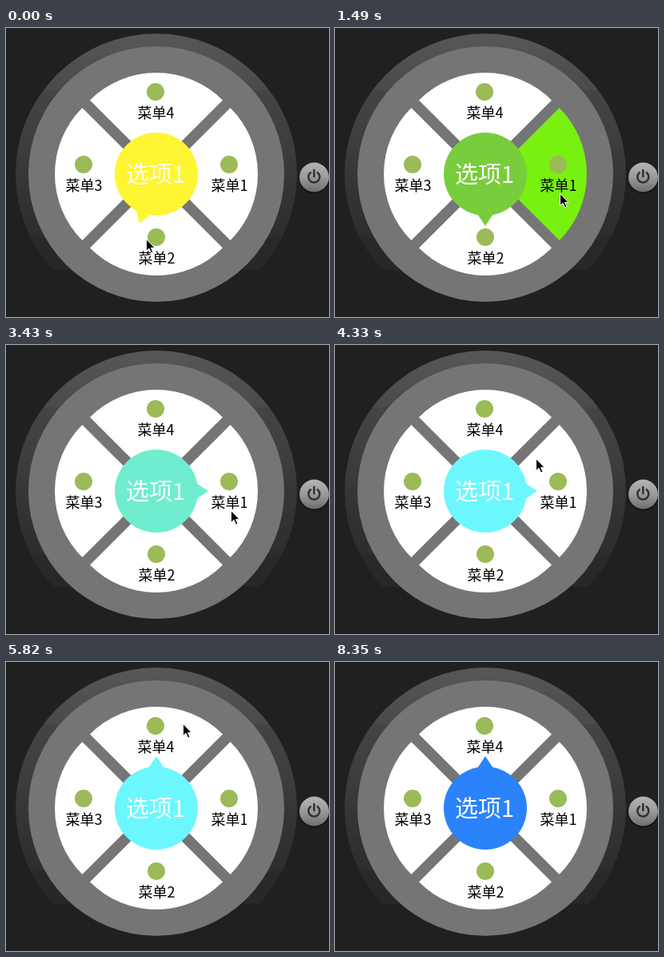
These frames come from a looping animation (404x362 px, 8800 ms). An HTML page:

```html
<!DOCTYPE html>
<html lang="zh-CN">
<head>
<meta charset="utf-8">
<title>Radial menu</title>
<style>
  html, body { margin: 0; width: 100%; height: 100%; overflow: hidden; background: #202020; }
  svg { display: block; width: 404px; height: 362px; }
  text { font-family: "Noto Sans CJK SC", "Noto Sans CJK JP", "Noto Sans CJK", sans-serif; text-anchor: middle; }
  .label { font-size: 18px; font-weight: 500; }
  .title { font-size: 29px; fill: #fff; }
</style>
</head>
<body>
<svg viewBox="0 0 404 362">
  <defs>
    <linearGradient id="rim" gradientUnits="userSpaceOnUse" x1="0" y1="7" x2="0" y2="303">
      <stop offset="0" stop-color="#575757"/>
      <stop offset=".24" stop-color="#4a4a4a"/>
      <stop offset=".24" stop-color="#444"/>
      <stop offset=".435" stop-color="#3f3f3f"/>
      <stop offset=".6" stop-color="#363636"/>
      <stop offset=".86" stop-color="#2d2d2d"/>
      <stop offset=".86" stop-color="#292929"/>
      <stop offset="1" stop-color="#272727"/>
    </linearGradient>
    <linearGradient id="knob" x1="0" y1="0" x2="0" y2="1">
      <stop offset="0" stop-color="#b4b4b4"/>
      <stop offset=".5" stop-color="#9a9a9a"/>
      <stop offset="1" stop-color="#6e6e6e"/>
    </linearGradient>
    <clipPath id="upper"><rect width="404" height="303"/></clipPath>
  </defs>

  <rect width="404" height="362" fill="#202020"/>
  <circle cx="188" cy="183" r="176" fill="url(#rim)" clip-path="url(#upper)"/>
  <circle cx="188" cy="183" r="160" fill="#757575"/>
  <g id="menu"></g>

  <g id="hub">
    <circle cx="188" cy="183" r="52"/>
    <path id="tail" d="M178 133L188 118L198 133Z"/>
  </g>
  <text class="title" x="187" y="194">选项1</text>

  <circle cx="385.5" cy="188" r="19.5" fill="#151515"/>
  <circle cx="385.5" cy="187" r="18.5" fill="url(#knob)"/>
  <g fill="none" stroke="#333" stroke-width="2.6" stroke-linecap="round">
    <path d="M380.8 181.2A7 7 0 1 0 389.8 181.2"/>
    <path d="M385.3 178V186"/>
  </g>

  <path id="cursor" d="M.5 .5V15.5L4 12.2L6.6 18L9 17L6.5 11.4H11Z" fill="#000" stroke="#fff"/>
</svg>
<script>
const LOOP = 8800;
const $ = id => document.getElementById(id);
const NS = 'http://www.w3.org/2000/svg';

function add(parent, tag, attrs, text = '') {
  const el = document.createElementNS(NS, tag);
  for (const k in attrs) el.setAttribute(k, attrs[k]);
  el.textContent = text;
  return parent.appendChild(el);
}

// Four quarter pies, each pushed outward to leave the diagonal gaps.
const items = [
  { angle: 90, x: 279, y: 171, label: '菜单1' },
  { angle: 180, x: 188, y: 262, label: '菜单2' },
  { angle: 270, x: 97, y: 171, label: '菜单3' },
  { angle: 0, x: 187, y: 80, label: '菜单4' }
];
const wedges = items.map(({ angle, x, y, label }) => {
  const wedge = add($('menu'), 'path', {
    d: 'M188 173.4L105 90.4A117.4 117.4 0 0 1 271 90.4Z',
    transform: `rotate(${angle} 188 183)`
  });
  add($('menu'), 'circle', { cx: x, cy: y, r: 11, fill: '#9bba58' });
  add($('menu'), 'text', { class: 'label', x: x + .5, y: y + 33 }, label);
  return wedge;
});

// Each move: first step, last step, number of steps, from, to.
const YELLOW = [255, 245, 50], GREEN = [120, 205, 60], CYAN = [108, 247, 255], BLUE = [42, 131, 251];
const colors = [
  [1340, 1490, 2, YELLOW, GREEN],
  [3130, 3580, 4, GREEN, CYAN],
  [7010, 7160, 2, CYAN, BLUE]
];
const turns = [
  [150, 150, 1, [199], [180]],
  [1630, 2080, 4, [180], [90]],
  [5230, 5820, 5, [90], [0]]
];
const moves = [
  [590, 740, 2, [175, 264], [281, 207]],
  [4180, 4630, 4, [281, 207], [221, 77]],
  [7900, 8350, 4, [221, 77], [410, 430]]
];
const presses = [[1490, 1630, 0], [5080, 5230, 3]];

function valueAt(track, t) {
  let value = track[0][3];
  for (const [start, end, n, from, to] of track) {
    if (t < start) break;
    const step = n > 1 ? Math.floor((t - start) / (end - start) * (n - 1)) + 1 : 1;
    const p = Math.min(step / n, 1);
    value = from.map((v, i) => v + (to[i] - v) * p);
  }
  return value;
}

function draw(t) {
  $('hub').setAttribute('fill', `rgb(${valueAt(colors, t).map(Math.round)})`);
  $('tail').setAttribute('transform', `rotate(${valueAt(turns, t)[0]} 188 183)`);
  $('cursor').setAttribute('transform', `translate(${valueAt(moves, t)})`);
  wedges.forEach((wedge, i) => {
    const pressed = presses.some(([on, off, item]) => item === i && t >= on && t < off);
    wedge.setAttribute('fill', pressed ? '#78f010' : '#fff');
  });
}

const began = performance.now();
function tick() {
  draw((performance.now() - began) % LOOP);
  requestAnimationFrame(tick);
}
tick();
</script>
</body>
</html>
```
